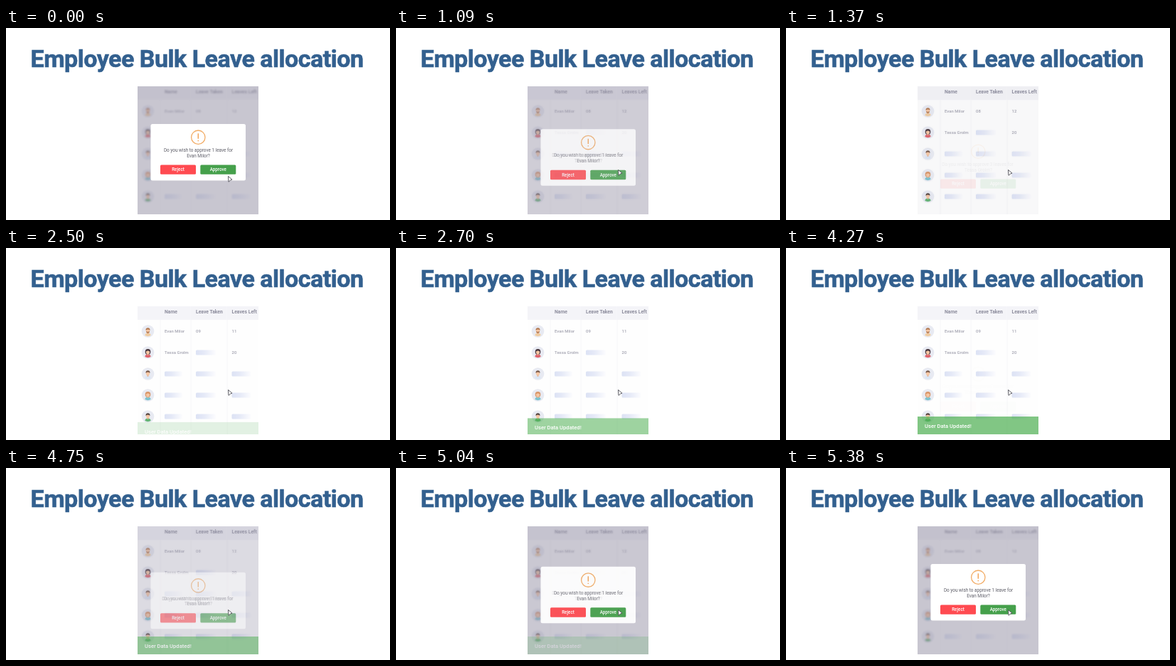
These frames come from a looping animation (540 px wide and 270 px high, 5430 ms). An HTML page:

```html
<!DOCTYPE html>
<html lang="en">
<head>
<meta charset="utf-8">
<title>Employee Bulk Leave allocation</title>
<style>
  html, body { margin: 0; width: 100%; height: 100%; overflow: hidden; background: #fff; }
  svg { display: block; width: 540px; height: 270px; font-family: Roboto, sans-serif; }
  .title { font-size: 34px; font-weight: 700; letter-spacing: -.5px; fill: #33608f; stroke: #33608f; stroke-width: .6; }
  .head { font-size: 6.8px; font-weight: 700; fill: #8d8d9d; }
  .cell { font-size: 6px; font-weight: 500; fill: #a3a3b0; }
  .ask { font-size: 6.4px; fill: #5c5c66; text-anchor: middle; }
  .label { font-size: 6.3px; font-weight: 500; fill: #fff; text-anchor: middle; }
  .toast { font-size: 7.6px; font-weight: 500; fill: #fff; }
</style>
</head>
<body>
<svg viewBox="0 0 540 270">
  <defs>
    <linearGradient id="fade">
      <stop stop-color="#dce2f4"/>
      <stop offset=".4" stop-color="#e5e9f7"/>
      <stop offset="1" stop-color="#fcfcfe"/>
    </linearGradient>
    <filter id="blur" x="-10%" y="-10%" width="120%" height="120%">
      <feGaussianBlur stdDeviation="1.1"/>
    </filter>
    <clipPath id="screen"><rect x="185" y="82" width="170" height="180"/></clipPath>
  </defs>

  <text class="title" x="34.5" y="55.2">Employee Bulk Leave allocation</text>

  <g clip-path="url(#screen)">
    <g id="table"></g>
    <use id="soft" href="#table" filter="url(#blur)"/>
    <rect id="shade" x="185" y="82" width="170" height="180" fill="#9490a4"/>
    <g id="toast">
      <rect x="185" y="237" width="170" height="40" fill="#4caf50"/>
      <text class="toast" x="195" y="253">User Data Updated!</text>
    </g>
    <g id="dialog">
      <rect x="203.5" y="135" width="133.5" height="79.5" rx="2.5" fill="#fff"/>
      <circle cx="270.3" cy="153.7" r="9.7" fill="none" stroke="#f2ad68" stroke-width="1.3"/>
      <path d="M270.3 148.3v7.4M270.3 157.8v1.4" stroke="#f2a154" stroke-width="1.4"/>
      <g id="question">
        <text class="ask" x="270.5" y="174">Do you wish to approve 1 leave for</text>
        <text class="ask" x="270.5" y="181.7">Evan Milor?</text>
      </g>
      <g id="ghost">
        <text class="ask" x="269.5" y="174">Do you wish to approve 3 leaves for</text>
        <text class="ask" x="270.5" y="181.7">Tessa Grolm?</text>
      </g>
      <rect x="217" y="192.5" width="50" height="13.3" rx="1.5" fill="#ff4a50"/>
      <rect x="273.3" y="192.5" width="50" height="13.3" rx="1.5" fill="#45a04b"/>
      <text class="label" x="242" y="201.3">Reject</text>
      <text class="label" x="298.3" y="201.3">Approve</text>
    </g>
  </g>
  <path id="cursor" d="M.5 .5L6 5.2L3.7 6L1 8.3Z" fill="#fff" stroke="#4a4a52" stroke-width=".9" stroke-linejoin="round"/>
</svg>
<script>
const LOOP = 5430;
const $ = id => document.getElementById(id);
const clamp = v => Math.max(0, Math.min(1, v));
const ramp = (t, from, to) => clamp((t - from) / (to - from));
const easeOut = (x, power) => 1 - (1 - x) ** power;
const smooth = x => x * x * (3 - 2 * x);

const COLUMNS = [223, 267, 317.5];
const text = (x, y, s, cls = 'cell') => `<text class="${cls}" x="${x}" y="${y}">${s}</text>`;
const pill = (x, y, w) => `<rect x="${x}" y="${y - 3.4}" width="${w}" height="6.8" rx="1.5" fill="url(#fade)"/>`;

function avatar(y, { hair, shirt, beard, bob }) {
  return `<g transform="translate(199.5 ${y})">
    <circle r="8.8" fill="#e8eaf2"/>
    <g transform="scale(.85)">
      ${bob ? `<ellipse cy="-1.2" rx="4.5" ry="4.6" fill="${hair}"/>` : ''}
      <path d="M-4.8 7.2Q-4.8 3 0 3T4.8 7.2Q0 9.6-4.8 7.2Z" fill="${shirt}"/>
      <path d="M-1.2 1h2.4v2.7L0 4.8L-1.2 3.7Z" fill="#eab08c"/>
      <ellipse cy="-1" rx="3" ry="3.6" fill="#f6c7a4"/>
      ${beard ? `<path d="M-3 0Q0 2 3 0Q2.8 3.2 0 3.2T-3 0Z" fill="${hair}"/>` : ''}
      <path d="M-3.4 -1.2Q-4 -5.4 0 -5.5T3.4 -1.2Q2.4 -3 0 -3T-3.4 -1.2Z" fill="${hair}"/>
    </g>
  </g>`;
}

const PEOPLE = [
  { name: 'Evan Milor', hair: '#b37a52', shirt: '#f0cda2', beard: true },
  { name: 'Tessa Grolm', left: '20', hair: '#4b3b42', shirt: '#e0626b', bob: true },
  { hair: '#7a5b4c', shirt: '#dbe6f5' },
  { hair: '#d9976a', shirt: '#7cc3cf', bob: true },
  { hair: '#54443f', shirt: '#62b473' },
];

function row(person, i) {
  const y = 117 + 30 * i, base = y + 2.2;
  const [name, taken, left] = COLUMNS;
  const first = text(taken, base, '08', 'cell old') + text(taken, base, '09', 'cell new')
    + text(left, base, '12', 'cell old') + text(left, base, '11', 'cell new');
  return avatar(y, person)
    + (person.name ? text(name, base, person.name) : pill(name, y, 25))
    + (i ? pill(taken, y, 28) + (person.left ? text(left, base, person.left) : pill(left, y, 27)) : first);
}

$('table').innerHTML = '<path d="M165 62h210v220H165z" fill="#fefefe"/><path d="M165 62h210v39H165z" fill="#f4f4f8"/>'
  + '<path d="M217 82v180M260 82v180M311 82v180" stroke="#f6f6f9" stroke-width=".8"/>'
  + ['Name', 'Leave Taken', 'Leaves Left'].map((s, i) => text(COLUMNS[i], 92.2, s, 'head')).join('')
  + PEOPLE.map(row).join('');

const fade = (node, value) => node.setAttribute('opacity', value);
const move = (node, x, y) => node.setAttribute('transform', `translate(${x} ${y})`);
const oldCounts = document.querySelectorAll('.old');
const newCounts = document.querySelectorAll('.new');

function draw(t) {
  // 1 = dialog fully open, 0 = plain table
  const open = t < 3000 ? 1 - easeOut(ramp(t, 1000, 2070), 4) : smooth(ramp(t, 4120, 5350));
  fade($('soft'), open * open);
  fade($('shade'), smooth(clamp(open * 1.15)) * .5);
  fade($('dialog'), smooth(open));
  move($('dialog'), 0, 24.5 * (1 - open));
  fade($('question'), open);
  fade($('ghost'), 1 - open);

  const updated = t < 3000 ? ramp(t, 2090, 2220) : 1 - open;
  oldCounts.forEach(node => fade(node, 1 - updated));
  newCounts.forEach(node => fade(node, updated));

  const shown = easeOut(ramp(t, 2450, 3110), 3);
  fade($('toast'), .7 * shown * (1 - open * open));
  move($('toast'), 0, 10 * (1 - shown));

  move($('cursor'), 312, t < 30 ? 208 : t < 80 ? 203 : 199);
}

function tick() {
  draw(performance.now() % LOOP);
  requestAnimationFrame(tick);
}
tick();
</script>
</body>
</html>
```
